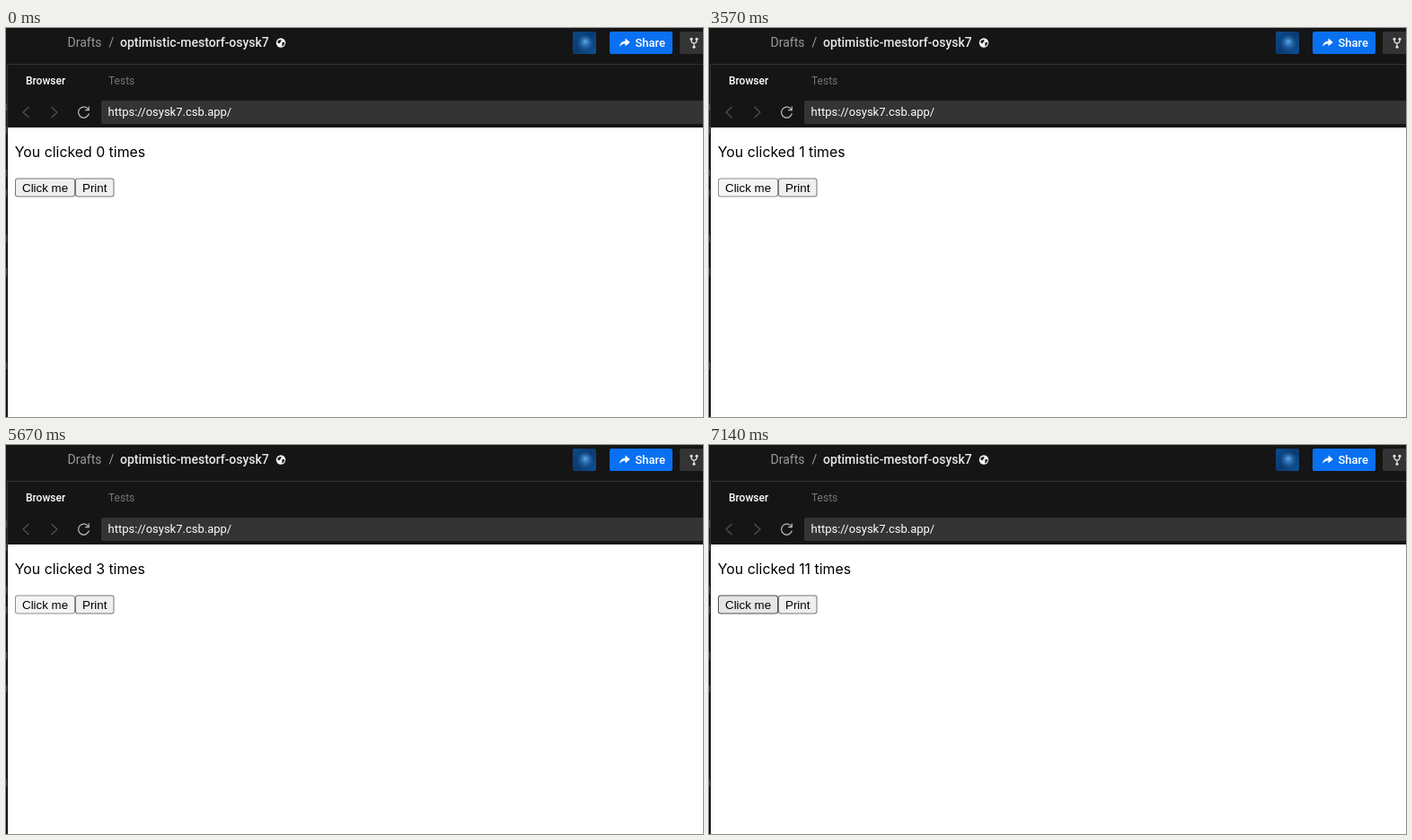
Animation, 776 px wide and 434 px high, one loop 8000 ms. Source, as an HTML page with a canvas:

```html
<!DOCTYPE html>
<html lang="en">
<head>
<meta charset="utf-8">
<title>Click counter</title>
<style>
html, body { margin: 0; width: 776px; height: 434px; overflow: hidden; background: #fff; }
canvas { display: block; }
</style>
</head>
<body>
<canvas id="stage" width="776" height="434"></canvas>
<script>
const ctx = document.getElementById('stage').getContext('2d');
const LOOP = 8000;
const UI = 'Roboto, sans-serif';

// Times at which the mouse goes down and up on "Click me".
const clicks = [
  [3080, 3220], [3570, 3710], [4060, 4200], [5670, 5810],
  [5950, 6020], [6090, 6230], [6300, 6370], [6440, 6580],
  [6650, 6790], [6860, 6930], [7000, 7140]
];
const prints = [[4830, 4970]];
const clickHover = [[3010, 4550], [5250, LOOP]];
const printHover = [[4550, 5250]];

const looks = {
  idle: ['#efefef', '#767676'],
  hover: ['#e5e5e5', '#4f4f4f'],
  active: ['#f5f5f5', '#8d8d8d']
};

const within = (spans, t) => spans.some(([from, to]) => t >= from && t < to);

function stateAt(t, presses, hovers) {
  if (within(presses, t)) return 'active';
  return within(hovers, t) ? 'hover' : 'idle';
}

function box(x, y, w, h, color, radius = 0) {
  ctx.fillStyle = color;
  ctx.beginPath();
  ctx.roundRect(x, y, w, h, radius);
  ctx.fill();
}

function text(value, x, y, font, color) {
  ctx.font = font;
  ctx.fillStyle = color;
  ctx.fillText(value, x, y);
}

function stroke(path, color, width) {
  ctx.strokeStyle = color;
  ctx.lineWidth = width;
  ctx.stroke(new Path2D(path));
}

function fill(path, color) {
  ctx.fillStyle = color;
  ctx.fill(new Path2D(path));
}

function disc(x, y, r, color) {
  ctx.fillStyle = color;
  ctx.beginPath();
  ctx.arc(x, y, r, 0, Math.PI * 2);
  ctx.fill();
}

function avatar() {
  const shade = ctx.createLinearGradient(631, 4, 657, 29);
  shade.addColorStop(0, '#0a4c8c');
  shade.addColorStop(0.5, '#0b3a70');
  shade.addColorStop(1, '#0d5294');
  box(631, 4, 26, 25, shade, 2);
  const glow = ctx.createRadialGradient(645, 15, 1, 645, 17, 10);
  glow.addColorStop(0, '#4f9ddd');
  glow.addColorStop(1, 'rgba(30, 100, 170, 0)');
  box(631, 4, 26, 25, glow, 2);
}

function globe() {
  disc(306, 16.5, 5.2, '#f4f4f4');
  fill('M302.5 14.6l2.6-1.6 1.7 1-1.2 1.5-1.1 1.7-2-.6z', '#151515');
  fill('M307 16.6l2.7-.8 .5 1.6-1.8 2.6-1.3.3.5-2z', '#151515');
}

function forkIcon() {
  stroke('M763 13v1.2q0 2.3 3 2.8q3-.5 3-2.8V13M766 17v4', '#e8e8e8', 1.2);
  for (const [x, y] of [[763, 12.3], [769, 12.3], [766, 21.2]]) disc(x, y, 1.5, '#e8e8e8');
}

function header() {
  box(0, 0, 776, 111, '#151515');
  text('Drafts', 68.5, 21, `14px ${UI}`, '#999');
  text('/', 114.5, 21, `14px ${UI}`, '#999');
  text('optimistic-mestorf-osysk7', 127, 21, `500 14px ${UI}`, '#e8e8e8');
  globe();
  avatar();

  box(672, 4, 70, 25, '#0971f1', 2);
  fill('M689.5 11.6l5.3 4.3-5.3 4.3v-2.7q-4.300 0-6.500 3.500q.7-6 6.500-6.500z', '#fff');
  text('Share', 700.5, 21, `500 13px ${UI}`, '#fff');
  box(750, 4, 30, 25, '#343434', 2);
  forkIcon();

  box(1, 40, 775, 1, '#343434');
  text('Browser', 22, 63, `500 12px ${UI}`, '#fff');
  text('Tests', 114, 63, `12px ${UI}`, '#757575');

  stroke('M25.500 88l-6.500 6 6.500 6M50.500 88l6.500 6-6.500 6', '#555', 1.1);
  stroke('M91.800 91.200A6 6 0 1 0 92.400 95.500M92.300 87.500v4.200h-4.200', '#b8b8b8', 1.2);
  box(106, 81, 674, 26, '#343434', 2);
  text('https://osysk7.csb.app/', 113.5, 98, `13px ${UI}`, '#fff');
}

function leftEdge() {
  box(0, 41, 2, 393, '#151515');
  box(1, 41, 1, 70, '#343434');
  for (const y of [84, 110, 158, 180, 231, 268, 373]) box(0, y, 1, 8, '#484848');
}

function button(label, x, w, state) {
  const [face, edge] = looks[state];
  box(x, 167.5, w, 21, edge, 3);
  box(x + 1, 168.5, w - 2, 19, face, 2);
  text(label, x + 8, 182.5, '13.333px "Liberation Sans", Arial, sans-serif', '#000');
}

function draw(t) {
  box(0, 0, 776, 434, '#fff');
  header();
  leftEdge();
  const count = clicks.filter(([, up]) => t >= up).length;
  text(`You clicked ${count} times`, 9.8, 144, '15.85px Inter, sans-serif', '#000');
  button('Click me', 10, 67, stateAt(t, clicks, clickHover));
  button('Print', 77, 43.5, stateAt(t, prints, printHover));
}

function tick() {
  draw(performance.now() % LOOP);
  requestAnimationFrame(tick);
}
tick();
</script>
</body>
</html>
```
